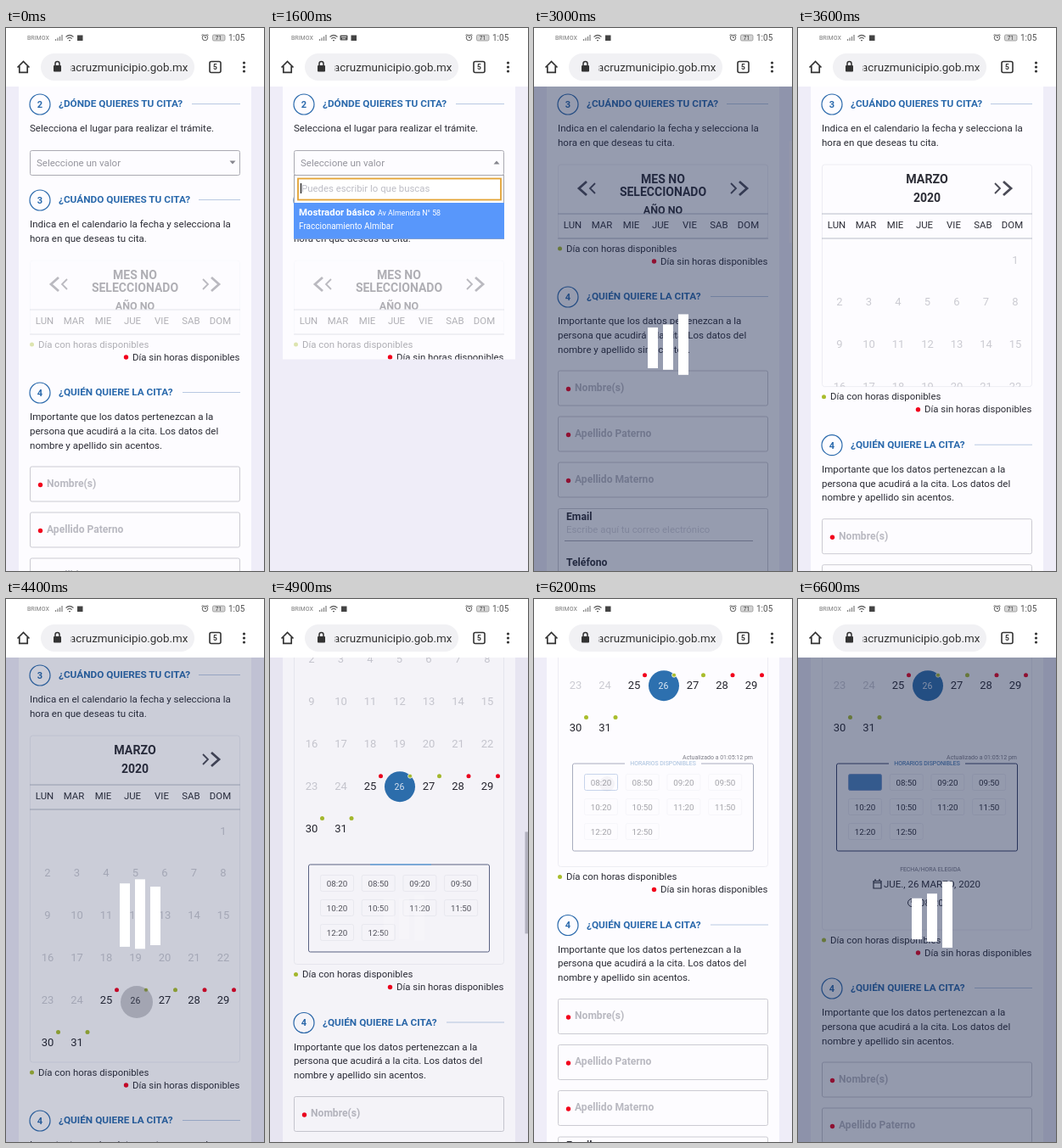
Animation, 304 px wide and 640 px high, one loop 6700 ms. Source, as an HTML page:

```html
<!DOCTYPE html>
<html lang="es">
<head>
<meta charset="utf-8">
<title>Cita</title>
<style>
html, body { margin: 0; width: 100%; height: 100%; overflow: hidden; background: #efedf8 }
svg { display: block; width: 304px; height: 640px; font-family: Roboto, "Open Sans", sans-serif }
</style>
</head>
<body>
<svg id="stage" viewBox="0 0 304 640"></svg>
<script>
const LOOP = 6700, BLUE = '#2a69ac', INK = '#2b2c35', RED = '#f2001c', GREEN = '#a9bd2c';
const LAVENDER = '#efedf8', PAPER = '#fdfcff';

// y is the middle of the capitals
const text = (x, y, s, size = 11.55, more = '') =>
  `<text x="${x}" y="${y + size * .36}" font-size="${size}" ${more}>${s}</text>`;
const bold = (x, y, s, size, fill = INK, more = '') =>
  text(x, y, s, size, `font-weight="700" fill="${fill}" ${more}`);
const mid = 'text-anchor="middle" ';
const rect = (x, y, w, h, more = '') => `<rect x="${x}" y="${y}" width="${w}" height="${h}" ${more}/>`;
const box = (x, y, w, h, stroke, more = '') => rect(x, y, w, h, `rx="2" fill="${PAPER}" stroke="${stroke}" ${more}`);
const dot = (x, y, r, fill, more = '') => `<circle cx="${x}" cy="${y}" r="${r}" fill="${fill}" ${more}/>`;
const path = (d, stroke, width = 1, more = '') =>
  `<path d="${d}" fill="none" stroke="${stroke}" stroke-width="${width}" ${more}/>`;
const group = (id, content, more = '') => `<g id="${id}" ${more}>${content}</g>`;

const section = (y, n, title, lineX) =>
  dot(40, y + 1, 12, PAPER, `stroke="${BLUE}" stroke-width="1.2"`) +
  bold(40, y + 1, n, 11, BLUE, mid) + bold(62, y, title, 11.8, BLUE) +
  path(`M${lineX} ${y + .5}H276`, '#b9c9e2');

const field = (y, label) =>
  box(28.5, y - 20.5, 247, 41, '#cbcbd2') + dot(40.5, y + 1, 2.7, RED) + bold(48, y - 1, label, 12.1, '#b9b9c1');

const chevrons = (x, dir) =>
  path(`M${x} 296l${6 * dir} 6l${-6 * dir} 6`, '#4a4a56', 1.8) +
  path(`M${x + 10 * dir} 294l${9 * dir} 8l${-9 * dir} 8`, '#4a4a56', 2.8);

function days() {
  let out = '';
  for (let d = 1; d <= 31; d++) {
    const cell = d + 5, x = 49 + 34.5 * (cell % 7), y = 386 + 49.8 * Math.floor(cell / 7);
    if (d === 26) {
      out += dot(x + .5, y + 1, 18, '#2d70af', 'id="chosen"') + text(x, y, d, 13, mid + 'id="day26"');
    } else {
      out += text(x, y, d, 13, mid + `fill="${d < 25 ? '#cbcbd2' : '#24242c'}"`);
    }
    if (d > 24) out += dot(x + 12.5, y - 11.5, 2.5, [25, 28, 29].includes(d) ? RED : GREEN,
      d === 26 ? 'stroke="#fff" stroke-width=".8"' : '');
  }
  return out;
}

const hours = '08:20 08:50 09:20 09:50 10:20 10:50 11:20 11:50 12:20 12:50'.split(' ').map((h, i) => {
  const x = 79 + 48.7 * (i % 4), y = 700 + 29 * Math.floor(i / 4);
  return box(x - 19.5, y - 9.5, 39, 19, '#eeeef4', i ? '' : 'id="firstHour"') +
    text(x, y, h, 9.8, mid + (i ? '' : 'id="firstLabel"'));
}).join('');

const calendar =
  rect(28.5, 274, 247, 87, 'id="frame" rx="3" fill="none" stroke="#ededf3"') +
  group('head',
    group('back', chevrons(72, -1)) + chevrons(232, 1) +
    group('noMonth', bold(152, 291, 'MES NO', 14, INK, mid) + bold(152, 305.5, 'SELECCIONADO', 14, INK, mid) +
      bold(152, 327, 'AÑO NO', 12.5, INK, mid)) +
    group('month', bold(152, 291, 'MARZO', 14.2, INK, mid) + bold(152, 313, '2020', 14, INK, mid)) +
    ['LUN', 'MAR', 'MIE', 'JUE', 'VIE', 'SAB', 'DOM'].map((d, i) => text(45.5 + 34.5 * i, 345, d, 11.4, mid)).join('') +
    path('M28 332H276M28 361H276', '#b8bcc8')) +
  group('body',
    days() +
    group('hours',
      box(45.5, 678, 213, 103, '#343f66') + hours +
      group('hoursTitle', rect(107, 674, 90, 8, `fill="${PAPER}"`) +
        text(152, 677.5, 'HORARIOS DISPONIBLES', 6.9, mid + `fill="${BLUE}"`)) +
      path('M118 678H190', '#4d9be0', 1.6, 'id="hoursLine"')) +
    text(258, 670, 'Actualizado a 01:05:12 pm', 7, 'id="updated" text-anchor="end" fill="#7c7c86"') +
    text(156, 803, 'FECHA/HORA ELEGIDA', 6.9, mid + 'fill="#777784"') +
    path('M89 816.5h9v8.5h-9zM89 818.5h9M91 814v3M96 814v3', INK, 1.2) +
    text(101, 820, 'JUE., 26 MARZO, 2020', 11.5) +
    dot(134, 842, 4.5, 'none', `stroke="${INK}"`) + path('M134 839v3h2', INK) +
    text(143, 842, '08:20', 11.5), 'clip-path="url(#bodyClip)"');

const lower =
  group('legend', dot(30.5, 373, 2.5, GREEN) + text(38, 372.5, 'Día con horas disponibles', 11.4)) +
  dot(141.5, 388, 2.7, RED) + text(149, 387.5, 'Día sin horas disponibles', 11.4) +
  section(429, 4, '¿QUIÉN QUIERE LA CITA?', 208) +
  ['Importante que los datos pertenezcan a la', 'persona que acudirá a la cita. Los datos del', 'nombre y apellido sin acentos.']
    .map((s, i) => text(28, 458 + 16.7 * i, s)).join('') +
  ['Nombre(s)', 'Apellido Paterno', 'Apellido Materno'].map((s, i) => field(537.5 + 54 * i, s)).join('') +
  box(28.5, 679.5, 247, 140, '#cbcbd2') +
  bold(38, 689, 'Email', 12.2) + text(38, 704, 'Escribe aquí tu correo electrónico', 11.4, 'fill="#d3d3da"') +
  path('M36 717.5H258', '#a9a9b3') + bold(38, 743, 'Teléfono', 12.2);

const page =
  rect(15, -600, 274, 2400, `fill="${PAPER}"`) +
  section(89, 2, '¿DÓNDE QUIERES TU CITA?', 219) +
  text(28, 118, 'Selecciona el lugar para realizar el trámite.') +
  box(28.5, 144.5, 247, 29, '#aaaab2') +
  text(36, 158.5, 'Seleccione un valor', 11.5, 'id="empty" fill="#95959d"') +
  text(36, 158.5, 'Mostrador básico', 11.5, 'id="picked"') +
  '<path id="caret" fill="#85858d"/>' +
  section(202, 3, '¿CUÁNDO QUIERES TU CITA?', 227) +
  text(28, 231, 'Indica en el calendario la fecha y selecciona la') +
  text(28, 247.5, 'hora en que deseas tu cita.') +
  calendar + group('lower', lower) +
  group('menu',
    rect(28.5, 173.5, 247, 75, 'fill="#fff" stroke="#a5a5ad"') +
    rect(33, 177.5, 239, 25, 'fill="#fff" stroke="#e3a233" stroke-width="1.8"') +
    text(37, 188.5, 'Puedes escribir lo que buscas', 11.4, 'fill="#bdbdc5"') +
    path('M36.5 183v12', '#111', 1.2) +
    rect(28, 206, 248, 42.5, 'fill="#5897fb"') +
    bold(34, 217, 'Mostrador básico', 11.4, '#fff') +
    text(127, 218, 'Av Almendra N° 58', 8.9, 'fill="#fff"') +
    text(34, 233.5, 'Fraccionamiento Almíbar', 10, 'fill="#fff"'));

const header =
  rect(0, 0, 304, 69, 'fill="#fff"') +
  text(25, 11.5, 'BRIMOX', 7, 'fill="#777"') +
  path('M58.5 15v-2M61 15v-3.5M63.5 15v-5M66 15v-7', '#888', 1.3) +
  path('M70.5 10.5q4.5-4 9 0M72.2 12.6q2.8-2.4 5.6 0M74 14.6h2', '#666', 1.2) +
  group('keys', rect(82.5, 8.5, 9, 6, 'rx="1" fill="#555"') + path('M84 10.5h6M85 12.7h4', '#fff', .8)) +
  rect(84, 8.5, 6.5, 6.5, 'id="note" fill="#444"') +
  dot(234.5, 11.5, 3.2, 'none', 'stroke="#555"') + path('M234.5 9.5v2h1.5M230.5 9l2-2M238.5 9l-2-2', '#555', .9) +
  rect(243.5, 8, 14.5, 7, 'rx="1.5" fill="#d5d5d5" stroke="#888" stroke-width=".7"') +
  text(250.5, 11.5, '71', 6.5, mid + 'fill="#333"') + text(262, 11.5, '1:05', 10, 'fill="#555"') +
  path('M13.5 46.5l7-7l7 7M15.8 45v7.3h9.4V45', '#333', 1.7) +
  rect(41, 30, 181, 32, 'rx="16" fill="#f1f1f4"') +
  rect(56, 44, 9, 7.5, 'rx="1" fill="#333"') + path('M58 44v-2a2.5 2.5 0 0 1 5 0v2', '#333', 1.5) +
  text(75, 46.5, 'acruzmunicipio.gob.mx', 13.4, 'fill="#333"') +
  rect(73, 36, 5, 20, 'fill="#f1f1f4" opacity=".65"') +
  rect(240, 39.5, 13, 13, 'rx="2" fill="none" stroke="#333" stroke-width="1.6"') +
  bold(246.5, 46, '5', 8.5, '#333', mid) +
  [41, 46, 51].map(y => dot(280.5, y, 1.6, '#333')).join('');

const stage = document.getElementById('stage');
stage.innerHTML =
  `<clipPath id="bodyClip">${rect(0, 361, 304, 0, 'id="bodyRect"')}</clipPath>` +
  rect(0, 0, 304, 640, `fill="${LAVENDER}"`) +
  group('page', page, `fill="${INK}"`) +
  rect(0, 390.5, 304, 250, `id="cut" fill="${LAVENDER}"`) +
  dot(0, 0, 1, '#55555f', 'id="touch"') +
  rect(0, 68, 304, 572, 'id="shade" fill="#1a264e"') +
  group('loader', rect(134, 0, 12, 0) + rect(152, 0, 12, 0) + rect(170, 0, 12, 0), 'fill="#fff"') +
  rect(300.5, 0, 3.5, 120, 'id="scrollbar" fill="#9c9ca8"') + header;

const el = {};
stage.querySelectorAll('[id]').forEach(node => el[node.id] = node);
const set = (id, values) => { for (const key in values) el[id].setAttribute(key, values[key]); };
const show = (id, opacity) => set(id, { opacity: +opacity });

// Eased value from alternating times and values
function key(t, ...k) {
  if (t <= k[0]) return k[1];
  for (let i = 2; i < k.length; i += 2) {
    if (t < k[i]) {
      const u = (t - k[i - 2]) / (k[i] - k[i - 2]);
      return k[i - 1] + (k[i + 1] - k[i - 1]) * u * u * (3 - 2 * u);
    }
  }
  return k[k.length - 1];
}

function drawLoader(t, shade) {
  const phase = t / 1000 + (t < 3700 ? .47 : t < 5500 ? .73 : .83);
  [...el.loader.children].forEach((bar, i) => {
    const u = (phase + .32 - .16 * i) % 1;
    const ease = x => 1 - (1 - x) ** 2.2;
    const p = u < .4 ? ease(u / .4) : u < .8 ? 1 - ease((u - .4) / .4) : 0;
    bar.setAttribute('y', 353 - 24 * p);
    bar.setAttribute('height', 48 + 36 * p);
  });
  show('loader', Math.min(1, shade * 5));
}

function draw(t) {
  const scroll = key(t, 2300, 0, 2800, 113, 4650, 113, 4900, 365, 5300, 484);
  const body = key(t, 3350, 0, 3800, 298, 4700, 298, 4900, 434.5, 5000, 438.5, 6350, 438.5, 6550, 513);
  const shade = key(t, 2550, 0, 2850, .45, 3200, .45, 3500, 0, 4250, 0, 4400, .22, 4550, .45,
    4650, .45, 4900, .04, 5050, 0, 6220, 0, 6500, .46);
  const menu = t >= 1300 && t < 2300, typing = t >= 1400 && t < 2300;
  const loaded = t >= 3350, selected = t >= 4700;

  set('page', { transform: `translate(0 ${-scroll})` });
  set('lower', { transform: `translate(0 ${body})` });
  set('bodyRect', { height: body });
  set('frame', { height: 87 + body });
  show('frame', key(t, 2500, .3, 2800, 1));

  show('menu', menu);
  set('caret', { d: menu ? 'M263.5 160.5h7l-3.5-4z' : 'M263.5 156.5h7l-3.5 4z' });
  show('empty', t < 2300);
  show('picked', t >= 2300);
  show('cut', t >= 1400 && t < 2000);
  show('keys', typing);
  set('note', { x: typing ? 95.5 : 84 });

  const active = key(t, 2500, .37, 2800, 1);
  show('head', active);
  show('legend', active);
  show('noMonth', !loaded);
  show('back', !loaded);
  show('month', loaded);

  show('chosen', selected);
  set('day26', { 'font-size': t >= 4150 ? 10.5 : 13, fill: selected ? '#dfeaf6' : INK });
  show('hours', key(t, 4700, 0, 4900, .8, 5100, .6, 5500, .42, 6220, .42, 6400, 1));
  show('hoursTitle', t >= 5000);
  show('hoursLine', t < 5000);
  show('updated', t >= 5000);
  const picked = t >= 6400;
  set('firstHour', { stroke: t >= 6100 ? '#7f9fd0' : '#eeeef4', fill: picked ? '#4c86c4' : PAPER });
  show('firstLabel', !picked);

  const late = t > 5500;
  set('touch', { cx: late ? 86 : 154, cy: late ? 218 : 475, r: late ? 9 : 19 });
  show('touch', late ? key(t, 6100, 0, 6200, .05, 6350, 0) : key(t, 4100, 0, 4250, .3, 4550, .3, 4680, 0));

  set('scrollbar', { y: 70 + .56 * scroll });
  show('scrollbar', key(t, 1990, 0, 2050, .7, 2900, .7, 3100, 0, 4650, 0, 4700, .7, 5500, .7, 5800, 0));
  show('shade', shade);
  drawLoader(t, shade);
}

const start = performance.now();
function tick() {
  draw((performance.now() - start) % LOOP);
  requestAnimationFrame(tick);
}
tick();
</script>
</body>
</html>
```
